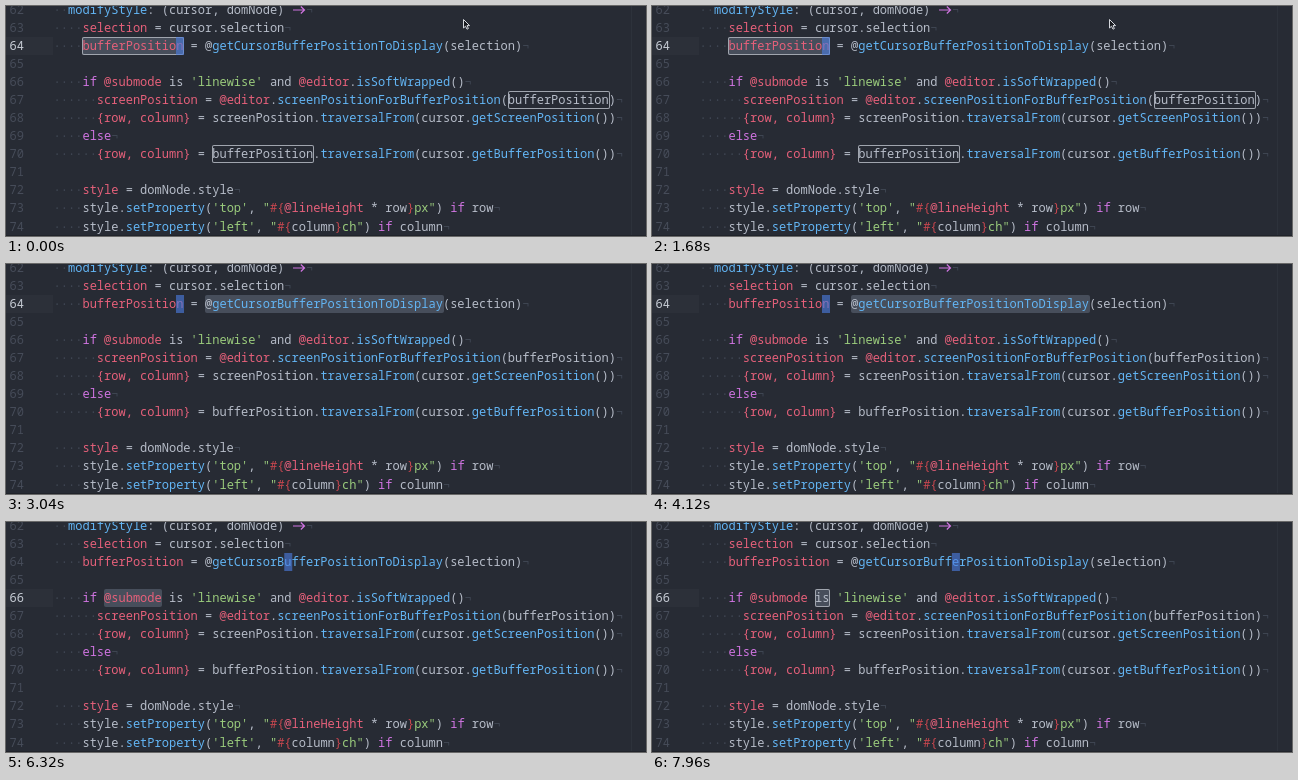
Animation, 640 px wide and 230 px high, one loop 8000 ms. Source, as an HTML page:

```html
<!DOCTYPE html>
<html lang="en">
<head>
<meta charset="utf-8">
<title>Code editor</title>
<style>
  html, body { margin: 0; width: 100%; height: 100%; overflow: hidden; background: #272b34; }
  #stage {
    position: relative; width: 640px; height: 230px; overflow: hidden;
    background: #272b34; color: #b6bcc8;
    font: 12.03px/1.5 "Noto Sans Mono", "DejaVu Sans Mono", monospace;
    font-variant-ligatures: none;
  }
  #stage > *, .scene > * { position: absolute; }
  .scene { left: 0; top: 0; }
  .guide { left: 625px; top: 0; width: 1px; height: 230px; background: #2d323b; }
  .edge { left: 0; top: 229px; width: 640px; height: 1px; background: #20232a; }

  /* --row counts from the first visible line, --col from the text margin */
  .line, .num, .band, .box, .cursor { top: calc(var(--row) * 1.5em - 5px); height: 1.5em; white-space: pre; }
  .line { left: 47.6px; }
  .num { left: 3.6px; color: #464c59; }
  .num.active { color: #c3c8d0; }
  .band { left: 0; width: 47px; background: #2c3039; }
  .box, .cursor { left: calc(47.6px + var(--col) * .6em); width: calc(var(--len) * .6em); }
  .box { margin-left: -.5px; padding-right: 1px; border-radius: 2px; }
  .fill { background: #474e5b; }
  .ring { box-shadow: inset 0 0 0 1px #a0a5ae; }
  .cursor { background: rgba(75, 125, 225, .62); }
  .red { color: #e5607a; }
  .blue { color: #63b5f4; }
  .purple { color: #cf74e0; }
  .green { color: #9acb7c; }
  .embed { color: #c8474f; }
  .light { color: #b6bcc8; }
  .faint { color: #414855; }
  .arrow { width: 1.2em; height: 10px; vertical-align: -1px; fill: none; stroke: #cf74e0; stroke-width: 1.2; }

  .scene, .step, .cursor { animation: 8s step-end infinite; }
  .buffer { animation-name: buffer; }
  .call { animation-name: call; }
  .argument { animation-name: argument; }
  .condition { animation-name: condition; }
  .submode { animation-name: submode; }
  .operator { animation-name: operator; }
  .upper { animation-name: upper; }
  .lower { animation-name: lower; }
  .cursor { animation-name: cursor; }
  @keyframes buffer { 0% { opacity: 1 } 36.25% { opacity: 0 } }
  @keyframes call { 0% { opacity: 0 } 36.25% { opacity: 1 } 57.5% { opacity: 0 } }
  @keyframes argument { 0% { opacity: 0 } 57.5% { opacity: 1 } 67.5% { opacity: 0 } }
  @keyframes condition { 0% { opacity: 0 } 67.5% { opacity: 1 } 76.25% { opacity: 0 } }
  @keyframes submode { 0% { opacity: 0 } 76.25% { opacity: 1 } 86.25% { opacity: 0 } }
  @keyframes operator { 0% { opacity: 0 } 86.25% { opacity: 1 } }
  @keyframes upper { 0% { opacity: 1 } 67.5% { opacity: 0 } }
  @keyframes lower { 0% { opacity: 0 } 67.5% { opacity: 1 } }
  @keyframes cursor {
    0% { transform: none }
    67.5% { transform: translateX(3.6em) }
    76.25% { transform: translateX(9em) }
    86.25% { transform: translateX(10.8em) }
  }
</style>
</head>
<body>
<div id="stage"></div>
<script>
const FIRST = 62;
const COLORS = { r: 'red', b: 'blue', p: 'purple', g: 'green', e: 'embed' };
const MARK = /([rbpge])\[(.*?)\]/g;

// A letter before brackets picks the colour of the bracketed text.
const code = [
  '  b[modifyStyle]: (cursor, domNode) ->',
  '    r[selection] = cursor.selection',
  '    r[bufferPosition] = @b[getCursorBufferPositionToDisplay](selection)',
  '',
  "    p[if] r[@submode] is g['linewise'] and r[@editor].b[isSoftWrapped]()",
  '      r[screenPosition] = r[@editor].b[screenPositionForBufferPosition](bufferPosition)',
  '      r[{row, column}] = screenPosition.b[traversalFrom](cursor.b[getScreenPosition]())',
  '    p[else]',
  '      r[{row, column}] = bufferPosition.b[traversalFrom](cursor.b[getBufferPosition]())',
  '',
  '    r[style] = domNode.style',
  `    style.b[setProperty](g['top'], g["]e[#{]r[@lineHeight] * rowe[}]g[px"]) p[if] row`,
  `    style.b[setProperty](g['left'], g["]e[#{]columne[}]g[ch"]) p[if] column`
];

// The first box of each selection is filled; each takes the last match on its line.
const scenes = {
  buffer: { word: 'bufferPosition', lines: [64, 67, 70], ring: true },
  call: { word: '@getCursorBufferPositionToDisplay', lines: [64] },
  argument: { word: 'selection', lines: [64, 63, 63], ring: true },
  condition: { word: 'if', lines: [66, 73, 74], ring: true },
  submode: { word: '@submode', lines: [66] },
  operator: { word: 'is ', lines: [66], ring: true }
};

const place = (cls, line, body = '', col = 0, len = 1) =>
  `<div class="${cls}" style="--row:${line - FIRST};--col:${col};--len:${len}">${body}</div>`;
const arrow = '<svg class="arrow" viewBox="0 0 14.4 10"><path d="M1 5H12.5M8.8 1.5 12.5 5 8.8 8.5"/></svg>';

function paint(text) {
  if (!text) return '';
  return text
    .replace(MARK, (_, key, word) => `<span class="${COLORS[key]}">${word}</span>`)
    .replace(/^ +/, pad => `<span class="faint">${'·'.repeat(pad.length)}</span>`)
    .replace('->', arrow) + '<span class="faint">¬</span>';
}

function boxes({ word, lines, ring }) {
  const taken = {};
  const len = word.trim().length;
  return lines.map((line, i) => {
    const text = code[line - FIRST].replace(MARK, '$2');
    const col = text.lastIndexOf(word, taken[line] ?? text.length);
    taken[line] = col - 1;
    return place(`box ${i ? '' : 'fill'} ${ring ? 'ring' : ''}`, line, '', col, len);
  }).join('');
}

let html = place('band step upper', 64) + place('band step lower', 66) +
  '<div class="guide"></div><div class="edge"></div>';
for (const [name, scene] of Object.entries(scenes)) {
  html += `<div class="scene ${name}">${boxes(scene)}</div>`;
}
code.forEach((text, i) => {
  html += place('num', FIRST + i, FIRST + i) + place('line', FIRST + i, paint(text));
});
html += place('num active step upper', 64, 64) + place('num active step lower', 66, 66);
html += place('cursor', 64, '', 17);
html += `<svg class="step buffer" style="left:456px;top:12px" width="9" height="13">
  <path d="M1.5 1.5V10L3.5 8.2 5 11.2 6.4 10.5 5 7.6H7.6Z" fill="#17191e" stroke="#d5d8de"/>
</svg>`;
document.getElementById('stage').innerHTML = html;
</script>
</body>
</html>
```
